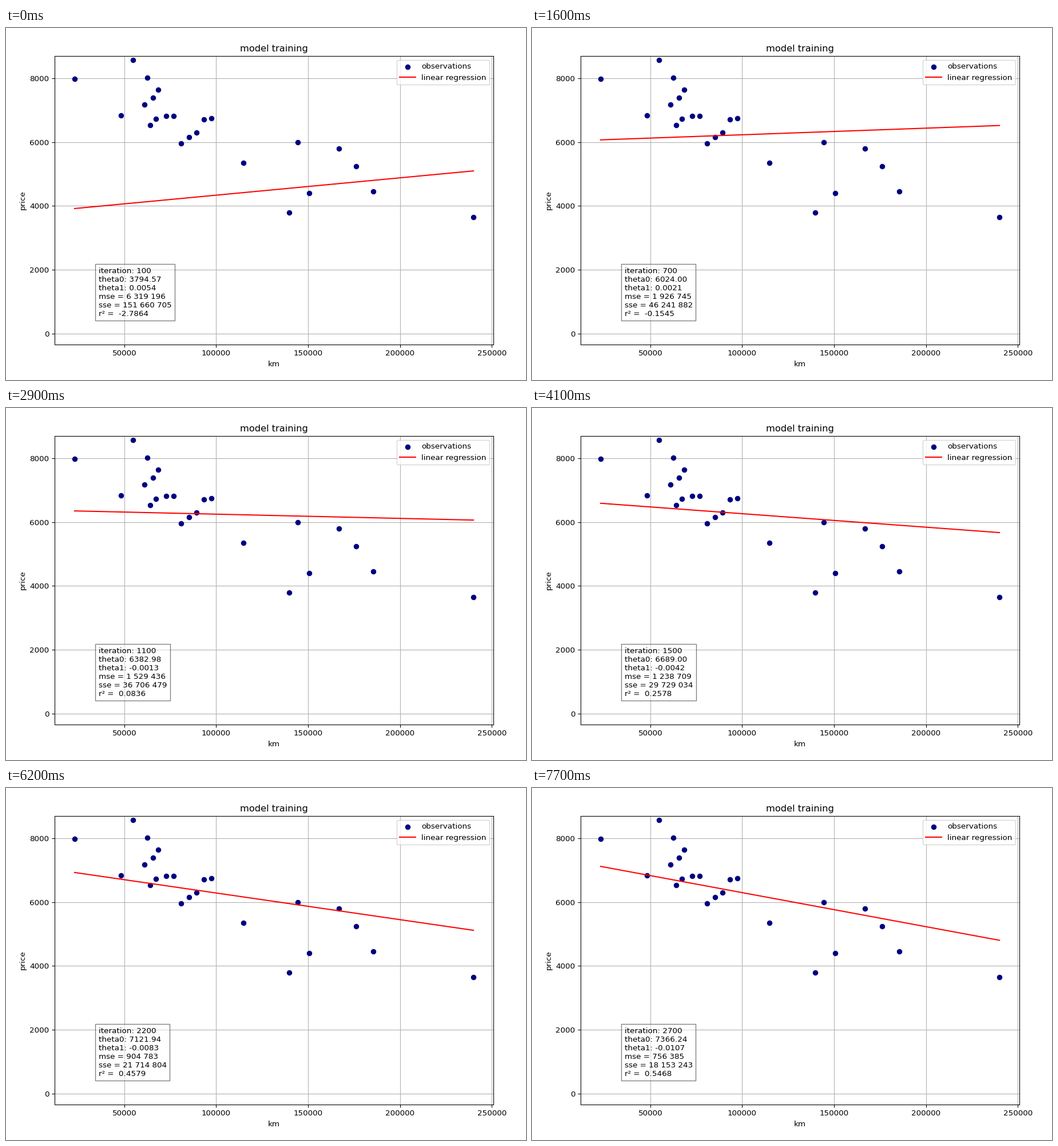
A matplotlib script for the animation above (8000 ms loop, 909 by 616 pixels).

```python
import matplotlib.pyplot as plt
import numpy as np
from matplotlib.animation import FuncAnimation

WIDTH, HEIGHT, DPI = 909, 616, 97.6
LEFT, RIGHT, TOP, BOTTOM = 85, 852, 49, 554
TICK_MS, LOOP_MS = 100, 8000

# Summary of the observations: the descent depends on nothing else.
COUNT, KM_MIN, KM_MAX, PRICE_MAX = 24, 22899, 240000, 8290
KM_MEAN, KM_STD = 101066.25, 51565.19
BEST0, BEST1, BEST_MSE = 8499.59965, -0.0214489636, 445645.25
RATE = 0.01

MEAN, VAR = KM_MEAN / KM_MAX, (KM_STD / KM_MAX) ** 2
PRICE_VAR = BEST_MSE + (BEST1 * KM_STD) ** 2


def train(last):
    """Gradient descent from zero on scaled km, tracked as offset from the best fit."""
    bias, slope = -BEST0, -BEST1 * KM_MAX
    history = []
    for _ in range(last + 1):
        bias -= RATE * (bias + MEAN * slope)
        slope -= RATE * (MEAN * bias + (MEAN ** 2 + VAR) * slope)
        mse = BEST_MSE + (bias + MEAN * slope) ** 2 + VAR * slope ** 2
        history.append((BEST0 + bias, BEST1 + slope / KM_MAX, mse))
    return history


def crowd():
    """Dense dots: a zigzag around the best fit that calms down to the right."""
    i = np.arange(1, 16)
    km = 1000 * np.interp(i, [1, 3, 8, 15], [48.2, 61, 68.5, 97.5])
    zigzag = 800 * np.clip(1 - i / 14, 0, 1) * np.cos(np.pi * i)
    waves = (390 * np.cos(2 * np.pi * (i - 2.5) / 6)
             + 300 * np.sin(2 * np.pi * i / 15))
    return km, BEST0 + BEST1 * km + zigzag + waves


def loners():
    """The few dots that stand apart, in thousands of km and of price."""
    points = [(22.9, 7.99), (114.8, 5.35), (139.8, 3.8), (144.5, 6), (150.5, 4.4),
              (166.8, 5.8), (176, 5.25), (185.5, 4.45), (240, 3.65)]
    return 1000 * np.array(points).T


def iteration_at(ms):
    """A new state every 300 ms, with a slightly longer hold at 1000."""
    if ms >= 2900:
        return 1100 + 100 * ((ms - 2900) // 300)
    return min(1000, 100 + 100 * ((ms + 200) // 300))


def spaced(value):
    return f"{int(value):,}".replace(",", " ")


def padded(low, high):
    margin = 0.05 * (high - low)
    return low - margin, high + margin


def summary(iteration, theta0, theta1, mse):
    return "\n".join([
        f"iteration: {iteration}",
        f"theta0: {theta0:.2f}",
        f"theta1: {theta1:.4f}",
        f"mse = {spaced(mse)}",
        f"sse = {spaced(mse * COUNT)}",
        f"r² =  {1 - mse / PRICE_VAR:.4f}",
    ])


history = train(iteration_at(LOOP_MS - TICK_MS))
ends = np.array([KM_MIN, KM_MAX])

plt.rcParams["font.family"] = "DejaVu Sans"
# The tiny surplus keeps the pixel size from being rounded down.
fig = plt.figure(figsize=((WIDTH + 1e-6) / DPI, (HEIGHT + 1e-6) / DPI), dpi=DPI)
ax = fig.add_axes([LEFT / WIDTH, 1 - BOTTOM / HEIGHT,
                   (RIGHT - LEFT) / WIDTH, (BOTTOM - TOP) / HEIGHT])
ax.scatter(*np.hstack([crowd(), loners()]), color="navy", label="observations")
line, = ax.plot(ends, ends, color="red", label="linear regression")
info = ax.text(0.1, 0.1, "", transform=ax.transAxes,
               bbox=dict(facecolor="white", alpha=0.5))

# The vertical range also covers the line after its very first step.
first0, first1, _ = history[0]
ax.set_xlim(padded(KM_MIN, KM_MAX))
ax.set_ylim(padded(first0 + first1 * KM_MIN, PRICE_MAX))
ax.set_title("model training")
ax.set_xlabel("km")
ax.set_ylabel("price")
ax.grid(True)
ax.set_axisbelow(True)
ax.legend(loc="upper right")


def update(frame):
    iteration = iteration_at(frame * TICK_MS)
    theta0, theta1, mse = history[iteration]
    line.set_ydata(theta0 + theta1 * ends)
    info.set_text(summary(iteration, theta0, theta1, mse))
    return line, info


anim = FuncAnimation(fig, update, frames=LOOP_MS // TICK_MS,
                     interval=TICK_MS, repeat=True, repeat_delay=0)
plt.show()
```
